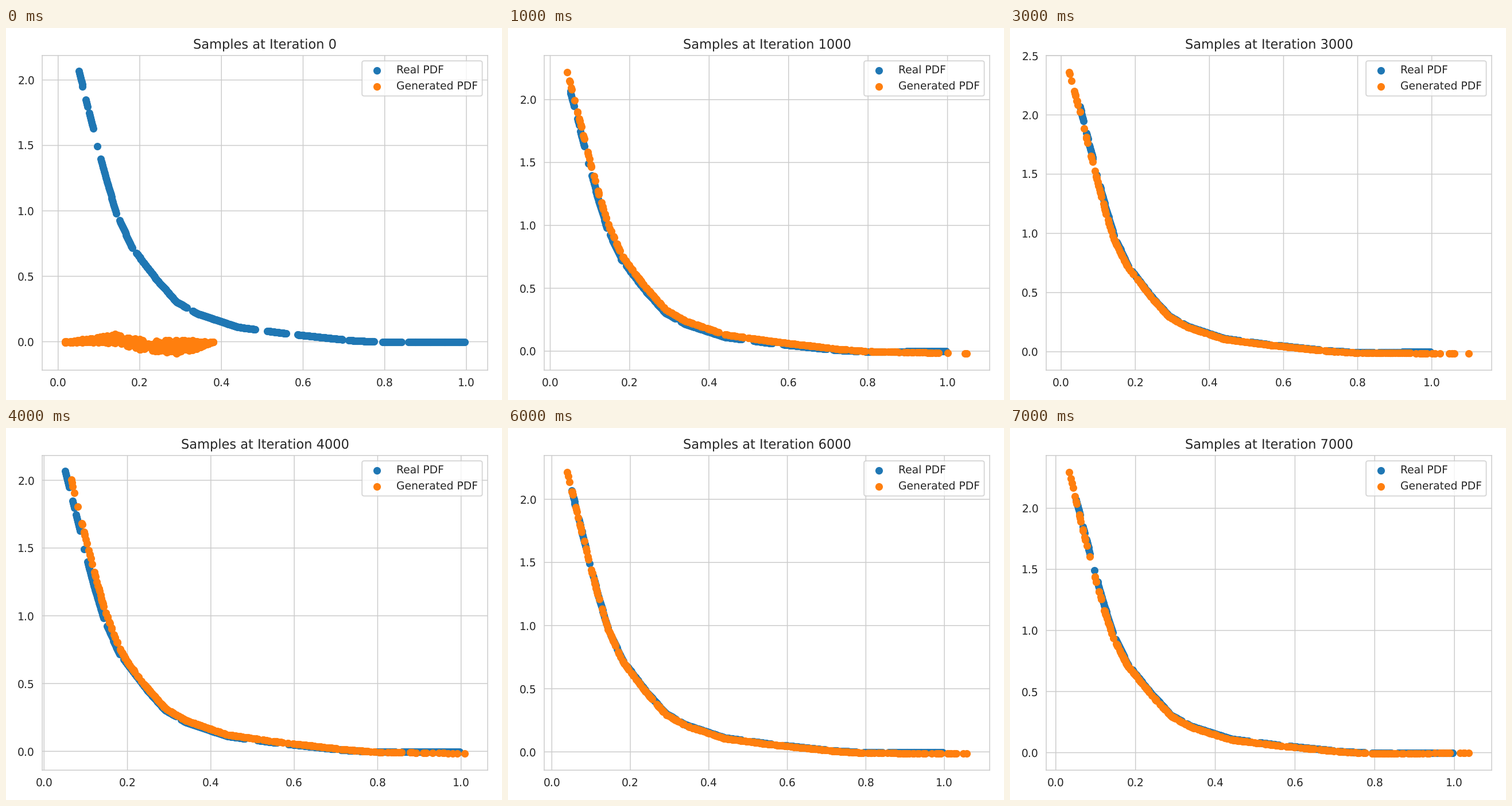
Animation of 864 by 648 pixels, one loop 8000 ms. Source, as a matplotlib script:

```python
import numpy as np
import matplotlib.pyplot as plt
from matplotlib.animation import FuncAnimation
from matplotlib.ticker import FormatStrFormatter, MultipleLocator

W, H, DPI = 864, 648, 135
LEFT, RIGHT, TOP, BOTTOM = 63.1, 839, 47.9, 596
PAD_X, PAD_Y = 39.9, 29  # pixels between the outermost dots and the frame
BLUE, ORANGE, INK, RULE = "#1f77b4", "#ff7f0e", ".15", ".8"

plt.rcParams.update({
    "font.family": "DejaVu Sans",
    "text.color": INK,
    "text.hinting": "none",
    "path.snap": False,
    "axes.edgecolor": RULE,
    "axes.linewidth": 0.8,
    "axes.axisbelow": True,
    "grid.color": RULE,
    "grid.linewidth": 0.8,
})

# Bends of the decaying density
KNOTS = np.array([
    (0.02, 2.43), (0.05, 2.075), (0.097, 1.488), (0.12, 1.217),
    (0.143, 0.978), (0.18, 0.726), (0.24, 0.48), (0.29, 0.305),
    (0.34, 0.216), (0.44, 0.112), (0.56, 0.062), (0.72, 0.009),
    (0.8, -0.004), (1.1, 0.0),
])
REAL_BOX = [(0.0506, -0.004), (0.996, 2.06)]
# Stretches where no real sample fell
GAPS = [(0.061, 0.068), (0.0725, 0.0757), (0.087, 0.0962), (0.0978, 0.1035),
        (0.1435, 0.1505), (0.182, 0.19), (0.317, 0.328), (0.4825, 0.511),
        (0.56, 0.586), (0.696, 0.7115), (0.775, 0.794), (0.843, 0.858)]
# First and last x, then the vertical error at the top, head, knee and tail
TRAINED = [
    (0.0426, 1.0484, 0.056, 0.060, 0.030, -0.018),
    (0.0320, 1.0420, 0.000, 0.015, 0.012, -0.010),
    (0.0215, 1.0997, -0.051, -0.040, -0.008, -0.0145),
    (0.0654, 1.0088, 0.120, 0.115, 0.015, -0.0148),
    (0.0356, 1.0818, 0.039, 0.025, -0.005, -0.0188),
    (0.0390, 1.0570, 0.010, -0.005, -0.008, -0.012),
    (0.0334, 1.0359, 0.024, -0.035, -0.010, -0.002),
]


def density(x):
    return np.interp(x, *KNOTS.T)


def real_samples():
    x = np.linspace(0.0506, 0.996, 700)
    for a, b in GAPS:
        x = x[(x <= a) | (x >= b)]
    return np.column_stack([x, density(x)])


def untrained():
    """Loose cloud near zero, between an upper and a lower edge."""
    rng = np.random.default_rng(4)
    edge_x = [0.0172, 0.06, 0.14, 0.2, 0.29, 0.33, 0.38]
    upper = [0, 0.018, 0.058, 0.018, 0.012, 0.012, -0.003]
    lower = [-0.006, -0.006, -0.01, -0.06, -0.09, -0.065, -0.003]
    x = rng.uniform(edge_x[0], edge_x[-1], 350)
    y = rng.uniform(np.interp(x, edge_x, lower), np.interp(x, edge_x, upper))
    return np.column_stack([np.r_[x, edge_x, edge_x], np.r_[y, upper, lower]])


def trained(seed, first, last, top, head, knee, tail):
    """Random draws along the density, thinning out towards the tail."""
    rng = np.random.default_rng(seed)
    x = np.r_[first, first + (last - first) * rng.beta(1.15, 1.6, 350), last]
    error = np.interp(x, [first, 0.07, 0.12, 0.2, 0.7, last],
                      [top, head, head, knee, knee / 3, tail])
    return np.column_stack([x, density(x) + error])


def limits(lo, hi, size, pad):
    margin = (hi - lo) * pad / (size - 2 * pad)
    return lo - margin, hi + margin


states = [untrained()]
states += [trained(seed, *params) for seed, params in enumerate(TRAINED, 1)]

fig = plt.figure(figsize=(W / DPI, H / DPI), dpi=DPI, facecolor="white")
ax = fig.add_axes([LEFT / W, 1 - BOTTOM / H, (RIGHT - LEFT) / W, (BOTTOM - TOP) / H])
ax.grid(True)
ax.tick_params(bottom=False, left=False, labelcolor=INK)
for axis, step in ((ax.xaxis, 0.2), (ax.yaxis, 0.5)):
    axis.set_major_locator(MultipleLocator(step))
    axis.set_major_formatter(FormatStrFormatter("%.1f"))

ax.scatter(*real_samples().T, color=BLUE, label="Real PDF")
generated = ax.scatter([], [], color=ORANGE, label="Generated PDF")
ax.legend(loc="upper right", edgecolor=RULE, framealpha=0.8)
title = ax.set_title("")


def update(i):
    points = states[i]
    box = np.vstack([points, REAL_BOX])
    (x_lo, y_lo), (x_hi, y_hi) = box.min(axis=0), box.max(axis=0)
    generated.set_offsets(points)
    ax.set_xlim(limits(x_lo, x_hi, RIGHT - LEFT, PAD_X))
    ax.set_ylim(limits(y_lo, y_hi, BOTTOM - TOP, PAD_Y))
    title.set_text(f"Samples at Iteration {1000 * i}")
    return generated, title


anim = FuncAnimation(fig, update, frames=len(states), interval=1000,
                     repeat=True, repeat_delay=0, blit=False)
plt.show()
```
